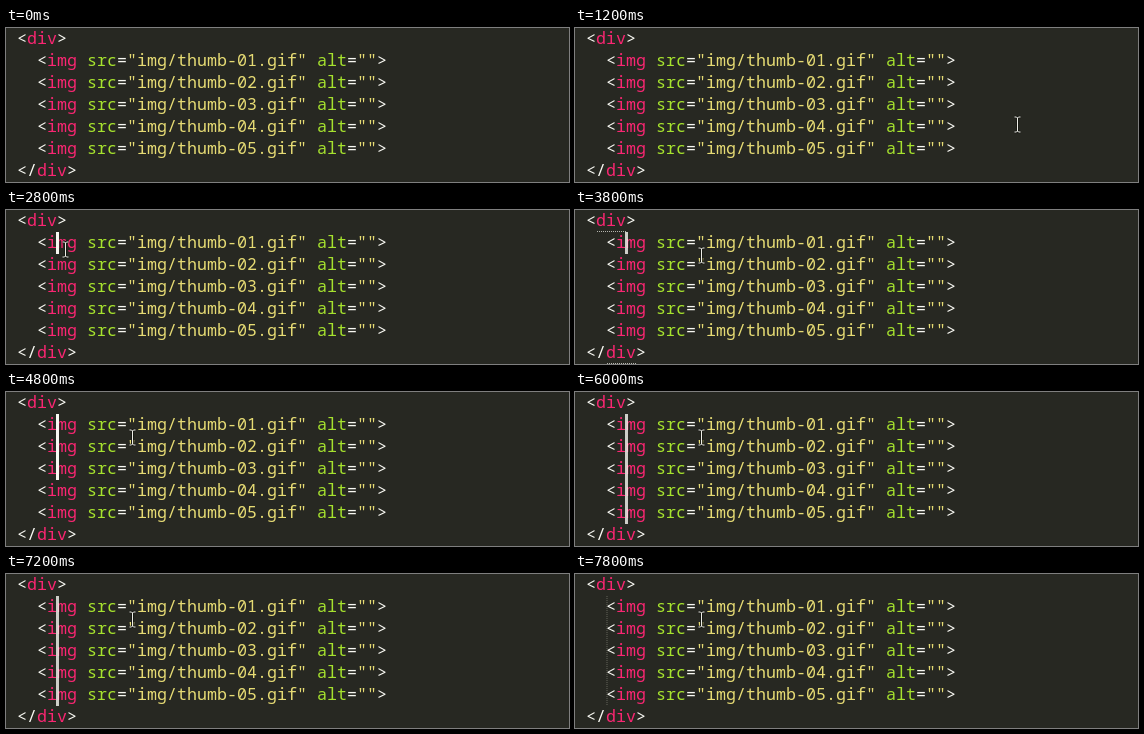
Animation of 563x154 px, one loop 8000 ms. Source, as an HTML page:

```html
<!DOCTYPE html>
<html lang="en">
<head>
<meta charset="utf-8">
<title>Multiple carets</title>
<style>
  html, body { margin: 0; width: 100%; height: 100%; overflow: hidden; background: #272822; }
  svg { display: block; width: 563px; height: 154px; }
  text { font: 500 16.667px "Noto Sans Mono", "DejaVu Sans Mono", monospace; white-space: pre; fill: #f8f8f2; }
  .tag { fill: #f92672; }
  .attr { fill: #a6e22e; }
  .str { fill: #e6db74; }
  #marks { stroke: #b4b4ae; stroke-dasharray: 1 1; }
  #guide { stroke: #45463e; stroke-width: 2; stroke-dasharray: 1 1; }
  #pointer { fill: none; stroke: #161712; stroke-width: 2.6; }
  #pointer .core { stroke: #eeeee8; stroke-width: 1; }
</style>
</head>
<body>
<svg viewBox="0 0 563 154">
  <defs>
    <path id="beam" d="M-3 -7.5H-1L0 -6.5L1 -7.5H3M0 -6.5V6.5M-3 7.5H-1L0 6.5L1 7.5H3"/>
  </defs>
  <rect width="563" height="154" fill="#272822"/>
  <path id="guide" d="M32 22V132"/>
  <g id="code"></g>
  <path id="marks" d="M22 21.5H51M32 153.5H61"/>
  <rect id="caret" x="50" y="22" width="3" fill="#f8f8f2"/>
  <g id="pointer"><use href="#beam"/><use href="#beam" class="core"/></g>
</svg>
<script>
  const LOOP = 8000, STEP = 200, LINE = 22, COL = 10, LEFT = 11;
  const FIRST_CLICK = 2800, MORE_CLICKS = 4400, CLICK_GAP = 400, ESCAPE = 7400;
  const $ = id => document.getElementById(id);
  const clamp = (v, lo = 0, hi = 1) => Math.min(hi, Math.max(lo, v));
  const progress = (t, from, to) => clamp((t - from) / (to - from));
  const easeOut = p => 1 - (1 - p) ** 4;
  const easeInOut = p => p * p * (3 - 2 * p);

  const image = n => [
    ['', '<'], ['tag', 'img'], ['attr', ' src'], ['', '='],
    ['str', `"img/thumb-0${n}.gif"`], ['attr', ' alt'], ['', '='], ['str', '""'], ['', '>']
  ];
  const lines = [
    [0, [['', '<'], ['tag', 'div'], ['', '>']]],
    ...[1, 2, 3, 4, 5].map(n => [2, image(n)]),
    [0, [['', '</'], ['tag', 'div'], ['', '>']]]
  ];

  function svg(parent, name, attrs, content = '') {
    const el = document.createElementNS('http://www.w3.org/2000/svg', name);
    for (const key in attrs) el.setAttribute(key, attrs[key]);
    el.textContent = content;
    return parent.appendChild(el);
  }

  lines.forEach(([indent, tokens], row) => {
    let col = indent;
    const text = svg($('code'), 'text', { y: 16 + row * LINE });
    for (const [kind, word] of tokens) {
      const lead = word.length - word.trimStart().length;
      svg(text, 'tspan', { class: kind, x: LEFT + (col + lead) * COL }, word.trim());
      col += word.length;
    }
  });

  // The pointer glides in to the first tag, then aside after the click.
  function pointerAt(t) {
    const arrive = easeOut(progress(t, 1200, 2200));
    const leave = easeInOut(progress(t, 2600, 3400));
    return [442 - 395 * arrive + 79.5 * leave, 96 - 57.5 * arrive + 7 * leave];
  }

  // On for 400 ms, off for 400 ms, with a dim 200 ms on either side of the gap.
  function blink(age) {
    const phase = age % 1200;
    if (phase < 400) return 1;
    return phase >= 600 && phase < 1000 ? 0 : .8;
  }

  function draw(now) {
    const t = Math.floor(now % LOOP / STEP) * STEP;
    const extra = clamp(Math.floor((t - MORE_CLICKS) / CLICK_GAP) + 1, 0, 4);
    const lastClick = extra ? MORE_CLICKS + (extra - 1) * CLICK_GAP : FIRST_CLICK;
    const editing = t >= FIRST_CLICK && t < ESCAPE;

    $('pointer').style.opacity = t < 1200 ? 0 : 1;
    $('pointer').setAttribute('transform', `translate(${pointerAt(t).map(v => Math.floor(v) + .5)})`);
    $('caret').setAttribute('height', (1 + extra) * LINE);
    $('caret').style.opacity = editing ? blink(t - lastClick) : 0;
    $('marks').style.opacity = t >= 3000 && t < 4200 ? 1 : 0;
    $('guide').style.opacity = clamp(Math.floor((t - ESCAPE) / 400 + 1) / 2);
  }

  const begin = performance.now();
  function tick() {
    draw(performance.now() - begin);
    requestAnimationFrame(tick);
  }
  tick();
</script>
</body>
</html>
```
